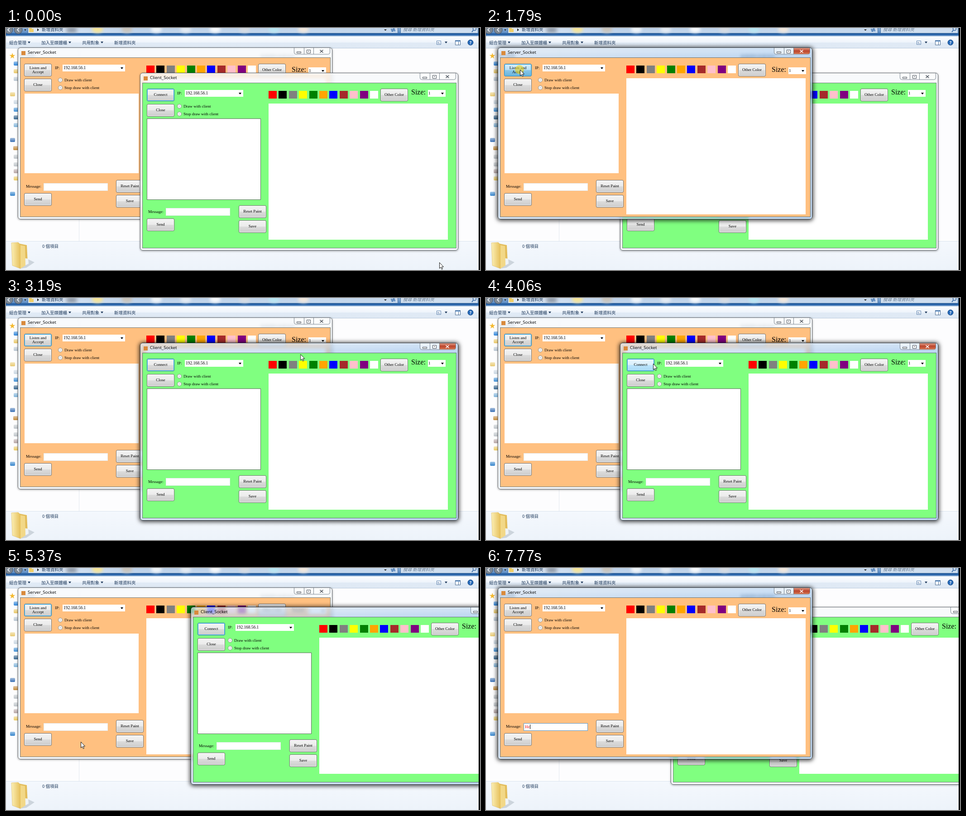
An HTML page that plays this animation: 1047 px wide and 535 px high, repeating every 8 s.

```html
<!DOCTYPE html>
<html lang="zh-Hant">
<head>
<meta charset="utf-8">
<title>Socket drawing demo</title>
<style>
html, body { margin: 0; width: 100%; height: 100%; overflow: hidden; background: #fff; }
div, svg { position: absolute; box-sizing: border-box; }
#stage { left: 0; top: 0; width: 1047px; height: 535px; overflow: hidden;
  font: 9px/12px "Liberation Serif", "Noto Sans CJK TC", serif; color: #000; background: #fdfdfe; }
.label { white-space: pre; }
.ui { font: 9.5px/12px "Noto Sans CJK TC", "Noto Sans CJK", "Open Sans", sans-serif; color: #1e395b; }
.arrow::after { content: ""; position: absolute; right: 4px; top: 6px;
  border: 3.5px solid transparent; border-top: 4px solid #000; border-bottom: 0; }

.win { border: 1px solid #5f666d; border-radius: 6px; background: rgba(247,249,252,.8);
  backdrop-filter: blur(3px); box-shadow: inset 0 0 0 1px #fffc, 0 1px 4px #0006; }
.win.active { border-color: #2c3845; box-shadow: inset 0 0 0 1px #fff8, 0 1px 10px 2px #000b;
  background: linear-gradient(#fff5, #fff0 22px), linear-gradient(90deg, rgba(192,213,236,.6), rgba(140,185,232,.6)); }
.title { font: 9.7px/12px "Open Sans", sans-serif; }
.area { box-shadow: 0 0 0 1px #4d5a5acc; }
.caps .x { fill: #0000; }
.active .caps .x { fill: url(#red); }
.active .caps .glyph { fill: #fff; }
.active .caps .cross { stroke: #fff; }

.btn { border: 1px solid #707070; border-radius: 3px; line-height: 9.5px; text-align: center; white-space: pre;
  display: flex; align-items: center; justify-content: center; box-shadow: inset 0 0 0 1px #fffb;
  background: linear-gradient(#f3f3f3, #ebebeb 50%, #dcdcdc 50%, #cdcdcd); }
.btn.focus { border-color: #3c7fb1; box-shadow: inset 0 0 0 1px #55c3ee; }
.btn.hover { border-color: #3c7fb1; background: linear-gradient(#eaf6fd, #d9f0fc 50%, #bee6fd 50%, #a7d9f5); }
.btn.down { background: linear-gradient(#d8eefa, #b8def3 50%, #8cc8ea 50%, #68b3db); }
.radio { border: 1px solid #8e8f8f; border-radius: 50%; background: radial-gradient(#d5d8da, #fff 75%); }
.white { background: #fff; }
.field { background: #fff; border: 1px solid #e6eaee; }
.field.focus { border-color: #5a9bd0; }
.typed { color: #f00; }
</style>
</head>
<body>
<div id="stage"></div>
<script>
const stage = document.getElementById('stage');

function box(parent, cls, x, y, w, h, text = '', bg = '') {
  const el = document.createElement('div');
  el.className = cls;
  el.style.cssText = `left:${x}px;top:${y}px;width:${w}px;height:${h}px;background:${bg}`;
  el.textContent = text;
  parent.append(el);
  return el;
}
// text whose vertical centre is y
const label = (parent, x, y, text, cls = '') => box(parent, 'label ' + cls, x, y - 6, 'auto', 12, text);

function svg(parent, x, y, w, h, body, cls = '') {
  parent.insertAdjacentHTML('beforeend',
    `<svg class="${cls}" style="left:${x}px;top:${y}px" width="${w}" height="${h}">${body}</svg>`);
  return parent.lastElementChild;
}

function explorer() {
  box(stage, '', 0, 0, 1044, 20, '', 'linear-gradient(#8fb0d6, #5b8cc4 11px, #245c9f 12px, #2f6bb0 16px, #c9daec 18px)');
  box(stage, '', 48, -4, 818, 16, '', 'linear-gradient(90deg, #dfe9f4, #bed2e9 30%, #c6d8ec)').style.border = '1px solid #44709f';
  box(stage, '', 871, -4, 172, 16, '', '#cfdeee').style.border = '1px solid #44709f';
  const haze = ['#f5e49a', '#c8c4bd', '#eef3f8', '#e3eaf2', '#f4f7fa', '#d5dbe2', '#b9e6f2', '#efe6dd'];
  haze.forEach((c, i) => box(stage, '', 190 + i * 65, -6, 24, 17, '', c).style.cssText += 'filter:blur(3px);border-radius:50%');
  box(stage, '', 134, 0, 22, 9, '', '#7c8592').style.filter = 'blur(4px)';
  const round = x => `<circle cx="${x}" cy="4" r="9" fill="#7b8794" stroke="#3f4f63"/><path d="M${x + 2} 0l-4 4 4 4" fill="none" stroke="#e4e9ee" stroke-width="2"/>`;
  svg(stage, 0, 0, 1044, 14, round(6) + round(27) +
    '<path d="M40 3h5l-2.500 3zM69 1l4 3-4 3zM835 3h6l-3 3z" fill="#222"/>' +
    '<path d="M51 0h6v2h4v7H51z" fill="#f0cf68"/>' +
    '<path d="M850 3h8l-2-2m4 5h-8l2 2" fill="none" stroke="#1e5aa0" stroke-width="1.500"/>' +
    '<circle cx="1035" cy="2" r="3.500" fill="none" stroke="#3f6fa8" stroke-width="1.500"/><path d="M1032 5l-3 4" stroke="#3f6fa8" stroke-width="2"/>');
  label(stage, 79, 3, '新增資料夾', 'ui');
  label(stage, 877, 3, '搜尋 新增資料夾', 'ui').style.cssText += 'font-style:italic;color:#6b7f95';

  box(stage, '', 0, 19, 1044, 26, '', 'linear-gradient(#fbfdff, #eef4fb 50%, #e0eaf5 55%, #dfe9f4)').style.borderBottom = '1px solid #b8c9dc';
  [[7, '組合管理'], [78, '加入至媒體櫃'], [168, '共用對象'], [239, '新增資料夾']]
    .forEach(([x, s]) => label(stage, x, 32, s, 'ui'));
  svg(stage, 0, 20, 1044, 24,
    '<path d="M48 10h6l-3 4zM138 10h6l-3 4zM209 10h6l-3 4zM969 10h6l-3 4z" fill="#1e395b"/>' +
    '<path d="M951.500 8.500h9v8h-9zM953 12h4M953 14h6" fill="#fff" stroke="#587fae"/>' +
    '<path d="M992.500 7.500h11v10h-11zM999.500 8v9" fill="#fff" stroke="#4a6b92"/><path d="M993 8h10v2h-10z" fill="#6b9bd0"/>' +
    '<circle cx="1026" cy="12" r="6" fill="#2569b8" stroke="#174a86"/>');
  label(stage, 1023.5, 32, '?', 'ui').style.cssText += 'color:#fff;font-weight:bold';

  label(stage, 562, 62, '這個資料夾是空的。', 'ui');
  box(stage, '', 161, 45, 1, 426, '', '#e4e9ef');
  label(stage, 7, 60, '★', 'ui').style.cssText += 'color:#f5b92e;font-size:14px';
  label(stage, 27, 60, '我的最愛', 'ui');
  [[22, 78, '#2f86dc'], [22, 95, '#e9c867'], [22, 112, '#b9c6d2'], [14, 146, '#e9ca70'],
   [22, 163, '#c9d6e2'], [22, 180, '#3f8fd6'], [22, 197, '#35658f'], [22, 214, '#7fb4dc'],
   [14, 247, '#3c72b5'], [21, 265, '#c58c3c'], [22, 284, '#bfc5ca'], [22, 301, '#bfc5ca'],
   [22, 316, '#b8a8a8'], [22, 332, '#eccb66'], [14, 366, '#3585cd']]
    .forEach(([x, y, c]) => box(stage, '', x - 5, y - 4, 11, 9, '', `linear-gradient(#fff8, #fff0), ${c}`).style.borderRadius = '2px');

  box(stage, '', 0, 471, 1044, 64, '', 'linear-gradient(#f4f8fd, #edf3fa)').style.borderTop = '1px solid #d9e3ef';
  label(stage, 80, 482, '0 個項目', 'ui');
  svg(stage, 8, 470, 58, 65,
    '<defs><linearGradient id="gold"><stop stop-color="#fbefb6"/><stop offset="1" stop-color="#e5bd55"/></linearGradient>' +
    '<linearGradient id="red" x2="0" y2="1"><stop stop-color="#dc9a85"/><stop offset=".5" stop-color="#bd452c"/><stop offset="1" stop-color="#d27350"/></linearGradient></defs>' +
    '<path d="M38 40l17 8-18 12-14 2z" fill="#98a4b066"/>' +
    '<path d="M18 6l20 4 2 40-18 10z" fill="#e3bd5c"/><path d="M34 39l7 1 1 11-8 4z" fill="#eef3f6"/>' +
    '<path d="M4 5l15-1 6 6-1 52-18-7z" fill="url(#gold)" stroke="#dbb65a" stroke-width=".6"/>' +
    '<path d="M24 10l10 2 1 43-11 7z" fill="#f2d888"/>');
}

const paints = ['red', 'black', 'gray', 'yellow', 'green', 'orange', 'blue', 'brown', 'pink', 'purple', 'white'];

function makeWindow(o) {
  const win = box(stage, 'win', o.x, o.y, o.w, o.h);
  // shift children by the 1px border so offsets count from the outer corner
  const root = box(win, '', -1, -1, o.w, o.h);
  box(root, '', 8, 8, 9, 9, '', '#d98a3c');
  label(root, 22, 11, o.title, 'title');
  svg(root, o.w - 85, 1, 80, 15,
    '<path d="M.5 0V10q0 4 4 4h71q4 0 4-4V0" fill="#fff8" stroke="#7b858f"/>' +
    '<path class="x" d="M44 0h35v10q0 3.500-4 3.500H44z"/><path d="M22.500 0v14M43.500 0v14" stroke="#7b858f"/>' +
    '<path class="glyph" d="M6.500 8.500h9v3h-9zM28.500 4.500h8v7h-8zM31 7.500h3" fill="#fff" stroke="#4c535c"/>' +
    '<path class="cross" d="M57.500 4.500l7 6m0-6l-7 6" stroke="#4c535c" stroke-width="1.600"/>', 'caps');
  box(root, 'area', 6, 23, o.w - 11, o.h - 29, '', o.color);

  const bx = o.bx, button = (x, y, s) => box(root, 'btn', x, y, 61, 28, s);
  const main = button(bx, o.by, o.main);
  button(bx, 69, 'Close');
  label(root, 82, 45, 'IP:');
  box(root, 'white arrow', 99, 38, o.ipW, 15);
  label(root, 101, 44.5, '192.168.56.1').style.fontSize = '9.4px';
  ['Draw with client', 'Stop draw with client'].forEach((s, i) => {
    const y = o.ry + i * 17;
    box(root, 'radio', o.rx - 5, y - 5, 10, 10);
    label(root, o.rx + 9, y, s);
  });
  box(root, 'white', 15, o.logY, 252, o.logH).style.border = o.logBorder;
  label(root, 18, 306.5, 'Message:');
  const input = box(root, 'field', 57, o.inY, 142, 17);
  button(bx, 322, 'Send');
  button(bx + 203, 293, 'Reset Paint');
  button(bx + 203, 326, 'Save');
  paints.forEach((c, i) => box(root, '', 284 + Math.round(i * 22.4), 40, 18, 17, '', c));
  button(531, o.by, 'Other Color');
  label(root, o.sx, o.sy + 5, 'Size:').style.fontSize = '16px';
  box(root, 'white arrow', o.sx + 37, o.sy, 39, 15);
  label(root, o.sx + 38, o.sy + 7, '1');
  box(root, 'white', 284, 68, 396, 301);
  return { win, main, input };
}

explorer();
const server = makeWindow({ x: 26, y: 43, w: 695, h: 380, title: 'Server_Socket', color: '#ffc080', main: 'Listen and\nAccept',
  bx: 14, by: 36, ipW: 138, rx: 94, ry: 72, logY: 102, logH: 176, logBorder: '0', inY: 300, sx: 605, sy: 44 });
const client = makeWindow({ x: 296, y: 99, w: 703, h: 393, title: 'Client_Socket', color: '#80ff80', main: 'Connect',
  bx: 15, by: 35, ipW: 129, rx: 87, ry: 74, logY: 101, logH: 180, logBorder: '1px solid #646f64', inY: 299, sx: 599, sy: 38 });

const typed = label(server.input, 2, 7, '', 'typed');
const caret = box(server.input, '', 2, 2, 1, 10, '', '#000');
const halo = box(stage, '', 0, 0, 20, 20, '', '#e8d428a0');
halo.style.borderRadius = '50%';
const arrow = svg(stage, 0, 0, 12, 18,
  '<path d="M.5.5v13l3-2.700 2 4.700 2-1-2-4.500h4z" fill="#fff" stroke="#000" stroke-width=".9"/>');
const beam = svg(stage, 167, 346, 8, 17, '<path d="M1 1.500h2.500v14H1m6-14H3.500m0 14H7" fill="none" stroke="#000"/>');
for (const el of [halo, arrow, beam]) el.style.zIndex = 5;
box(stage, '', 1044, 0, 3, 535, '', '#000').style.zIndex = 6;

// pointer moves: first step, last step, number of steps, x, y
const moves = [
  [70, 850, 11, 219, 77], [950, 1180, 4, 130, 101], [1260, 1420, 3, 75, 92],
  [2190, 2500, 5, 400, 137], [2580, 2960, 6, 782, 114], [3100, 3680, 8, 338, 148],
  [4060, 4060, 1, 369, 145], [4140, 4380, 4, 507, 115],
  [4980, 5370, 6, 165, 384], [5520, 5980, 7, 170, 354]
];
const presses = [[1790, 1870], [3030, 3100], [3820, 3900], [4610, 4980], [6150, 6220]];
const drags = [[4610, 20, -3], [4660, 66, -9], [4760, 100, -12], [4830, 112, -13]];

const within = (t, a, b) => t >= a && t < b;

function pointer(t, dx, dy) {
  let x = 957, y = 518;
  for (const [a, b, n, tx, ty] of moves) {
    if (a > 4600 && x === 507) { x += dx; y += dy; }
    if (t < a) break;
    const step = b > a ? Math.floor((t - a) / (b - a) * (n - 1)) + 1 : 1;
    const p = Math.min(1, step / n), e = n > 4 ? p * (2 - p) * .5 + p * p * (3 - 2 * p) * .5 : p;
    x += (tx - x) * e;
    y += (ty - y) * e;
  }
  return [x, y];
}

function render(t) {
  const [, dx, dy] = drags.filter(d => t >= d[0]).pop() || [0, 0, 0];
  const [x, y] = pointer(t, dx, dy);
  const down = presses.some(([a, b]) => within(t, a, b));
  const serverOn = within(t, 1790, 3030) || t >= 6150;
  const clientOn = within(t, 3030, 6150);

  client.win.style.transform = `translate(${dx}px,${dy}px)`;
  server.win.style.zIndex = serverOn ? 2 : 1;
  client.win.style.zIndex = serverOn ? 1 : 2;
  server.win.classList.toggle('active', serverOn);
  client.win.classList.toggle('active', clientOn);

  const paint = (el, over, focus) => {
    el.classList.toggle('hover', over);
    el.classList.toggle('down', over && down);
    el.classList.toggle('focus', focus);
  };
  paint(server.main, x >= 40 && x < 101 && y >= 79 && y < 106, within(t, 1790, 6150));
  paint(client.main, clientOn && x >= 311 && x < 372 && y >= 134 && y < 162, true);

  const overInput = t > 5000 && y < 360;
  server.input.classList.toggle('focus', overInput);
  typed.textContent = t < 7540 ? '' : t < 7770 ? 'H' : 'He';
  caret.style.left = 2 + typed.offsetWidth + 'px';
  caret.style.visibility = within(t, 6150, 6680) || t >= 7140 ? 'visible' : 'hidden';

  arrow.style.transform = `translate(${x}px,${y}px)`;
  arrow.style.visibility = overInput ? 'hidden' : 'visible';
  beam.style.visibility = overInput && t < 7540 ? 'visible' : 'hidden';
  halo.style.transform = `translate(${x - 11}px,${y - 10}px)`;
  halo.style.visibility = down ? 'visible' : 'hidden';
}

const start = performance.now();
function frame() {
  render((performance.now() - start) % 8000);
  requestAnimationFrame(frame);
}
frame();
</script>
</body>
</html>
```
